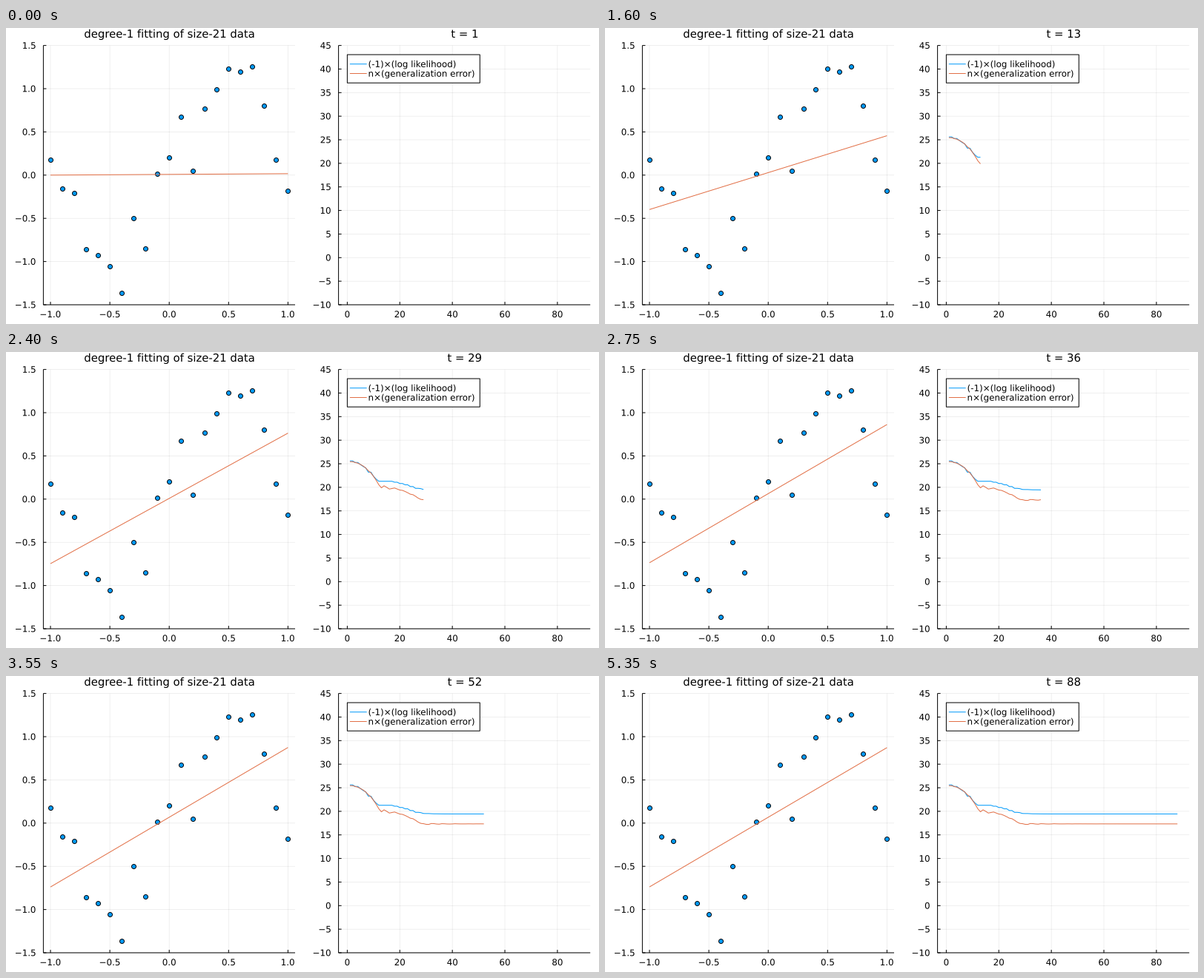
Recreate the animation shown at these times as a matplotlib script. Size 800 by 400 pixels, loop 8400 ms.

```python
import numpy as np
import matplotlib.pyplot as plt
from matplotlib.animation import FuncAnimation
from matplotlib.patches import PathPatch, Rectangle
from matplotlib.textpath import TextPath
from matplotlib.transforms import Affine2D

W, H, DPI = 800, 400, 100
PX = 72 / DPI                      # points per pixel
BLUE, ORANGE = "#009AFA", "#E26F46"
TOP, BOTTOM = 23.6, 374.0
SMALL, LARGE = 11.88, 14.85        # font sizes in pixels

plt.rcParams["font.family"] = "DejaVu Sans"

# ---- data and model: y = a + b x + noise, parameters (a, b, log sigma)
x = np.linspace(-1, 1, 21)
y = np.array([0.18, -0.16, -0.205, -0.857, -0.927, -1.056, -1.362,
              -0.502, -0.853, 0.012, 0.203, 0.672, 0.047, 0.773,
              0.988, 1.228, 1.195, 1.256, 0.80, 0.176, -0.185])
N = len(x)
NOISE = 0.3
STEPS = 88


def normal_loss(square, log_sigma):
    return N * (log_sigma + 0.5 * np.log(2 * np.pi)
                + 0.5 * square * np.exp(-2 * log_sigma))


def neg_log_lik(p):
    return normal_loss(np.mean((y - p[0] - p[1] * x) ** 2), p[2])


def general_error(p):
    """Expected loss when the truth is sin(pi x) on [-1, 1]."""
    a, b, s = p
    bias = 0.5 - 2 * b / np.pi + b * b / 3 + a * a
    return normal_loss(NOISE ** 2 + bias, s)


def nelder_mead(f, steps, n=3):
    """Adaptive Nelder-Mead; returns the centroid and best value per step."""
    expand, contract, shrink = 1 + 2 / n, 0.75 - 0.5 / n, 1 - 1 / n
    simplex = [np.zeros(n)] + [0.025 * e for e in np.eye(n)]
    pts = sorted(((f(p), p) for p in simplex), key=lambda v: v[0])
    centers = [np.mean([p for _, p in pts[:n]], axis=0)]
    best = [pts[0][0]]
    while len(best) < steps:
        c = np.mean([p for _, p in pts[:n]], axis=0)
        centers.append(c)
        best.append(pts[0][0])
        f_high, high = pts[n]
        ray = c - high

        def probe(k):
            return f(c + k * ray), c + k * ray

        new = probe(1)
        if new[0] < pts[0][0]:
            far = probe(expand)
            new = far if far[0] < new[0] else new
        elif new[0] >= pts[n - 1][0]:
            inside = new[0] >= f_high
            limit = f_high if inside else new[0]
            new = probe(-contract if inside else contract)
            if new[0] >= limit:
                new = None
        if new is None:
            low = pts[0][1]
            moved = [low + shrink * (p - low) for _, p in pts[1:]]
            pts = pts[:1] + [(f(p), p) for p in moved]
        else:
            pts[n] = new
        pts.sort(key=lambda v: v[0])
    return np.array(centers), np.array(best)


fits, losses = nelder_mead(neg_log_lik, STEPS)
errors = np.array([general_error(p) for p in fits])

# ---- stage in pixel coordinates, without rounding to whole pixels
fig = plt.figure(figsize=(W / DPI, H / DPI), dpi=DPI, facecolor="white")
ax = fig.add_axes([0, 0, 1, 1])
ax.set_xlim(0, W)
ax.set_ylim(H, 0)
ax.axis("off")


def line(xs, ys, color="black", width=1.0, **kw):
    return ax.plot(xs, ys, color=color, lw=width * PX, snap=False,
                   solid_capstyle="butt", **kw)[0]


def glyphs(px, base, s, size, align):
    """Outline of a string; align 0, 0.5 or 1 puts its left, middle or right at px."""
    path = TextPath((0, 0), s, size=size)
    box = path.get_extents()
    shift = px - box.x0 - align * box.width
    return Affine2D().scale(1, -1).translate(shift, base).transform_path(path)


def text(px, base, s, size=SMALL, align=0.5):
    patch = PathPatch(glyphs(px, base, s, size, align), fc="black", lw=0,
                      snap=False, zorder=5)
    return ax.add_patch(patch)


def panel(left, right, x_map, y_map, x_ticks, y_ticks, fmt):
    for v in x_ticks:
        px = x_map(v)
        line([px, px], [TOP, BOTTOM], width=0.6, alpha=0.1)
        line([px, px], [BOTTOM, BOTTOM - 4])
        text(px, 391, fmt(v))
    for v in y_ticks:
        py = y_map(v)
        line([left, right], [py, py], width=0.6, alpha=0.1)
        line([left, left + 4], [py, py])
        text(left - 10.8, py + 4.3, fmt(v), align=1)
    line([left, right], [BOTTOM, BOTTOM])
    line([left, left], [TOP, BOTTOM])


def scale(v0, p0, v1, p1):
    return lambda v: p0 + (np.asarray(v) - v0) * (p1 - p0) / (v1 - v0)


def decimal(v):
    return f"{v:.1f}".replace("-", "\u2212")


def integer(v):
    return f"{v:d}".replace("-", "\u2212")


lx, ly = scale(-1.06, 50.4, 1.06, 390.0), scale(1.5, TOP, -1.5, BOTTOM)
rx, ry = scale(0, 460.4, 80, 743.9), scale(45, TOP, -10, BOTTOM)
panel(50.4, 390.0, lx, ly, np.arange(-2, 3) / 2, np.arange(-3, 4) / 2, decimal)
panel(448.6, 788.2, rx, ry, range(0, 81, 20), range(-10, 46, 5), integer)

text(220.3, 13, "degree-1 fitting of size-21 data", LARGE)
title = text(618.4, 13, "t = 1", LARGE)

ax.plot(lx(x), ly(y), "o", ms=6 * PX, mfc=BLUE, mec="black", mew=0.95 * PX,
        snap=False)
fit_line = line([], [], ORANGE)
loss_line = line([], [], BLUE)
error_line = line([], [], ORANGE)

# ---- legend
ax.add_patch(Rectangle((460.4, 36), 178.9, 38.2, fc="white", ec="black",
                       lw=PX, snap=False, zorder=3))
for py, color, label in ((48.7, BLUE, "(-1)\u00d7(log likelihood)"),
                         (61.5, ORANGE, "n\u00d7(generalization error)")):
    line([463.9, 486.7], [py, py], color, zorder=4)
    text(489.6, py + 4.2, label, align=0)

FRAMES, INTERVAL, HOLD = 168, 50, 20
ends = np.array([-1.0, 1.0])


def draw(i):
    t = min(max(i - HOLD + 1, 1), STEPS)
    a, b, _ = fits[t - 1]
    steps = rx(np.arange(1, t + 1))
    fit_line.set_data(lx(ends), ly(a + b * ends))
    loss_line.set_data(steps, ry(losses[:t]))
    error_line.set_data(steps, ry(errors[:t]))
    title.set_path(glyphs(618.4, 13, f"t = {t}", LARGE, 0.5))
    return fit_line, loss_line, error_line, title


anim = FuncAnimation(fig, draw, frames=FRAMES, interval=INTERVAL,
                     init_func=lambda: draw(0), repeat=True, repeat_delay=0)
plt.show()
```
